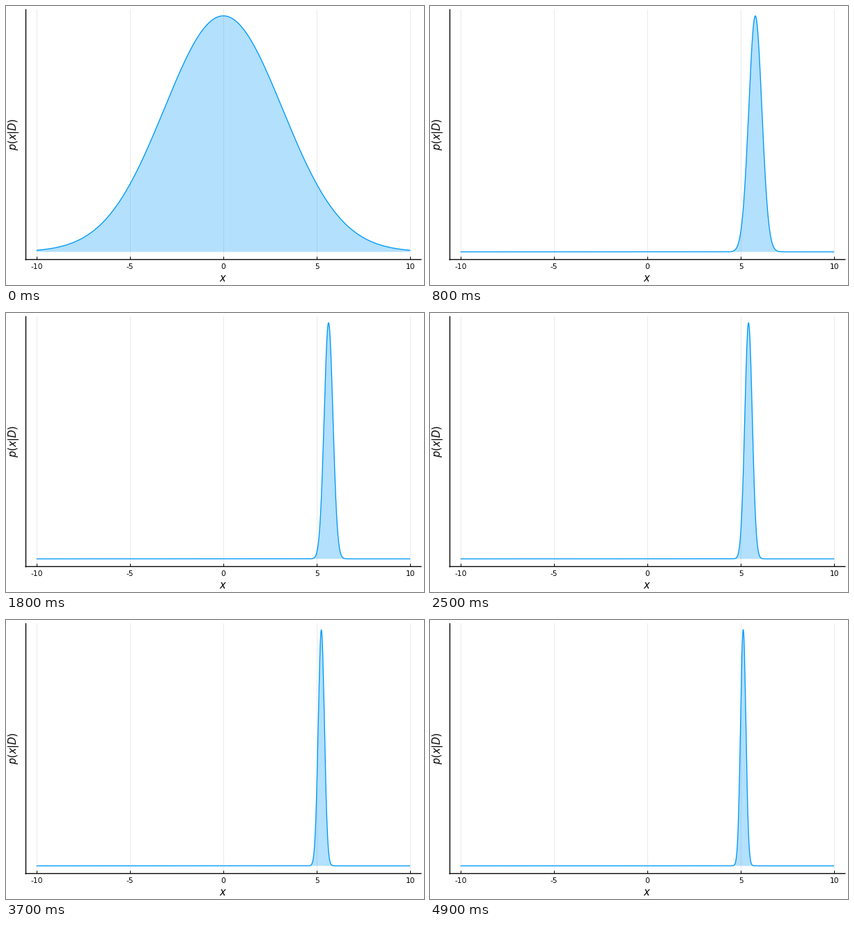
Write a matplotlib script that moves like this. It is 600 px wide and 400 px high and loops after 5000 ms.

```python
import numpy as np
import matplotlib.pyplot as plt
from matplotlib.animation import FuncAnimation

WIDTH, HEIGHT, DPI = 600, 400, 100
PT = 72 / DPI  # points per pixel
LEFT, RIGHT, TOP, BOTTOM = 27.5, 596.2, 4.0, 363.0
CENTER, UNIT = 312.0, 26.82
BASE, PEAK = 352.5, 338.4
BLUE = "#009AF9"

# Posterior means after some of the observations (prior N(0, 10), unit noise)
COUNTS = np.array([0, 4, 6, 12, 18, 24, 25, 30, 33, 36, 42, 48, 49])
MEANS = np.array([0, 5.59, 5.86, 5.695, 5.63, 5.43, 5.415, 5.39,
                  5.305, 5.25, 5.215, 5.122, 5.13])
PRIOR_PRECISION = 0.1
EVIDENCE = MEANS * (COUNTS + PRIOR_PRECISION)

plt.rcParams["font.family"] = "DejaVu Sans"
plt.rcParams["mathtext.fontset"] = "dejavusans"

fig = plt.figure(figsize=(WIDTH / DPI, HEIGHT / DPI), dpi=DPI, facecolor="white")
ax = fig.add_axes([0, 0, 1, 1])
ax.set(xlim=(0, WIDTH), ylim=(HEIGHT, 0))
ax.axis("off")


def to_px(x):
    return CENTER + UNIT * x


def stroke(xs, ys, width, **style):
    return ax.plot(xs, ys, lw=width * PT, solid_capstyle="butt", **style)[0]


for tick in range(-10, 11, 5):
    px = to_px(tick)
    stroke([px, px], [TOP, BOTTOM], 0.8, color="black", alpha=0.1, zorder=1)
    stroke([px, px], [BOTTOM, BOTTOM - 4.5], 1, color="black", zorder=4)
    ax.text(px, 376.6, str(tick), size=10.67 * PT, ha="center", va="baseline")

stroke([LEFT, LEFT], [TOP, BOTTOM + 0.6], 1.35, color="black", zorder=4)
stroke([LEFT - 0.6, RIGHT], [BOTTOM, BOTTOM], 1.35, color="black", zorder=4)
ax.text((LEFT + RIGHT) / 2, 395, "$x$", size=14.67 * PT,
        ha="center", va="baseline")
ax.text(15.3, (TOP + BOTTOM) / 2, "$p(x|D)$", size=14.67 * PT, rotation=90,
        rotation_mode="anchor", ha="center", va="baseline")

x = np.linspace(-10, 10, 1001)
area = ax.fill([0, 0, 0], [0, 0, 0], color=BLUE, alpha=0.3, lw=0, zorder=2)[0]
curve = stroke([], [], 1.35, color=BLUE, zorder=3, solid_joinstyle="round")


def update(count):
    precision = count + PRIOR_PRECISION
    mean = np.interp(count, COUNTS, EVIDENCE) / precision
    density = np.exp(-precision * (x - mean) ** 2 / 2)
    px, py = to_px(x), BASE - PEAK * density / density.max()
    curve.set_data(px, py)
    outline = np.column_stack([px, py])
    area.set_xy(np.vstack([[px[0], BASE], outline, [px[-1], BASE]]))
    return area, curve


animation = FuncAnimation(fig, update, frames=50, interval=100,
                          repeat=True, repeat_delay=0)
plt.show()
```
